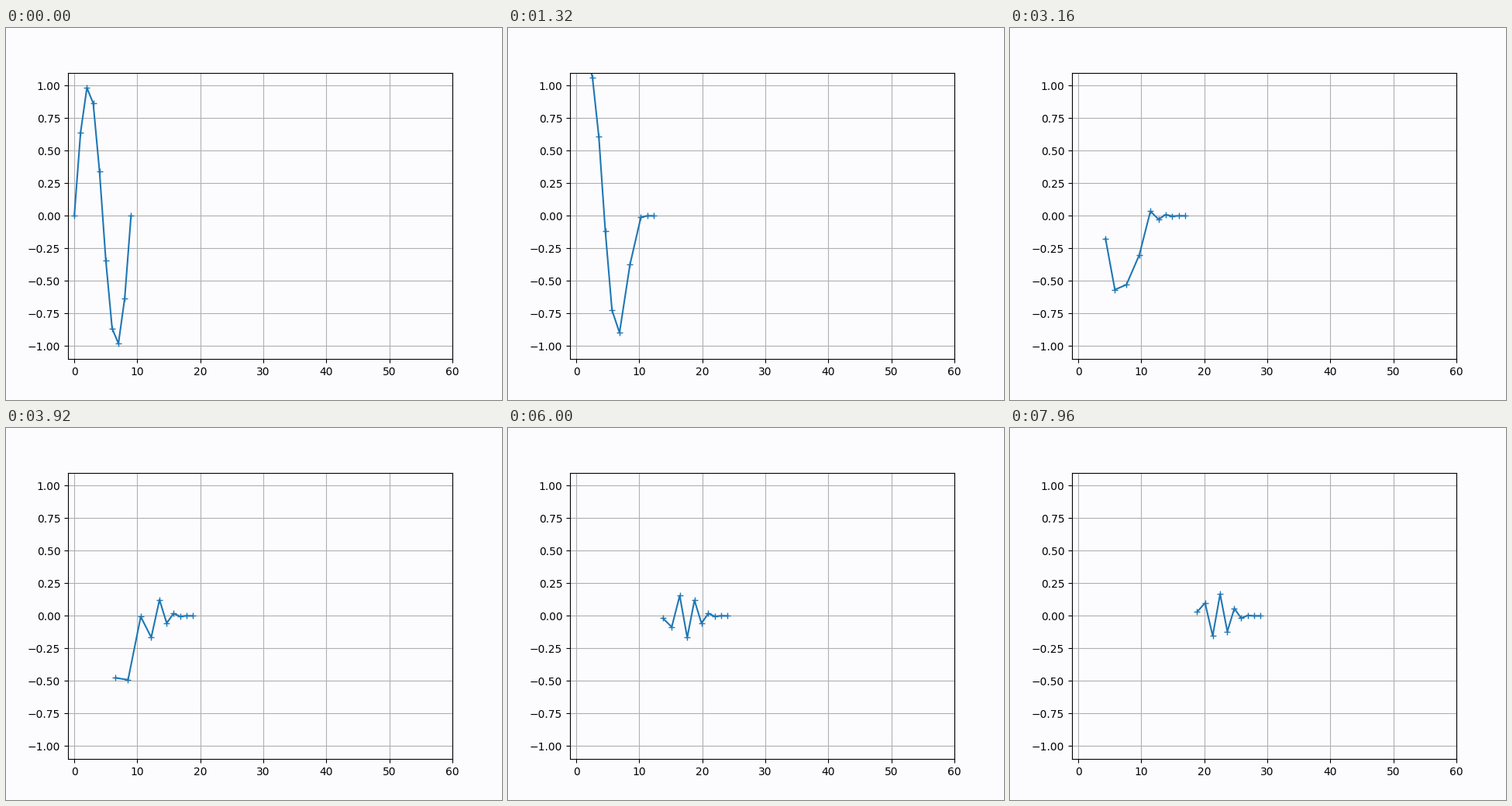
A matplotlib script for the animation above (8 s loop, 640 px wide and 480 px high).

```python
import numpy as np
import matplotlib.pyplot as plt
from matplotlib.animation import FuncAnimation

FRAMES, INTERVAL = 200, 40
NODES = 10
DT = 0.1              # the leader moves one unit per unit of time
DRIFT = 0.47          # speed of nodes the leader has not yet pulled along
PAPER = "#fcfcfe"

index = np.arange(NODES)
rank = NODES - 1 - index   # links between each node and the leader


def pulled(t):
    """How far (0..1) each node has been caught by the leader's pull."""
    u = (t - 1.15 * rank + 0.3) / (0.16 * rank + 0.05)
    return 1 / (1 + np.exp(-np.clip(u, -40, 40)))


def chain_x(t, grip):
    free = index + DRIFT * t
    towed = NODES - 1 + t - 0.97 * rank - 0.016 * rank**2
    return free + (towed - free) * grip


def chain_y(t, grip):
    # The starting sine slides toward the tail and grows until it is pulled out
    shift = 0.45 * t + 0.015 * t**2
    wave = (1 + 0.03 * t) * np.sin(2 * np.pi * (index + shift) / (NODES - 1))

    # The loose end whips
    whip = 0.45 * np.exp(-t / 12 - 2.5 * index) * np.sin(0.68 * t)

    # Towed nodes zigzag, strongest in the rear half
    s = t - 9.8
    beat = np.cos(2 * np.pi * (0.425 * s - 0.0078 * s**2))
    envelope = 0.17 * np.exp(-((rank - 6.3) / 2.2) ** 2)
    zigzag = -((-1.0) ** rank) * envelope * beat

    return wave * (1 - grip) + whip + zigzag * grip


fig, ax = plt.subplots(figsize=(6.4, 4.8), dpi=100, facecolor=PAPER)
ax.set_facecolor(PAPER)
ax.set_xlim(-1, 60)
ax.set_ylim(-1.1, 1.1)
ax.grid(True)
chain, = ax.plot([], [], "-+")


def update(frame):
    t = frame * DT
    grip = pulled(t)
    chain.set_data(chain_x(t, grip), chain_y(t, grip))
    return chain,


anim = FuncAnimation(fig, update, frames=FRAMES, interval=INTERVAL,
                     repeat=True, repeat_delay=0)
plt.show()
```
